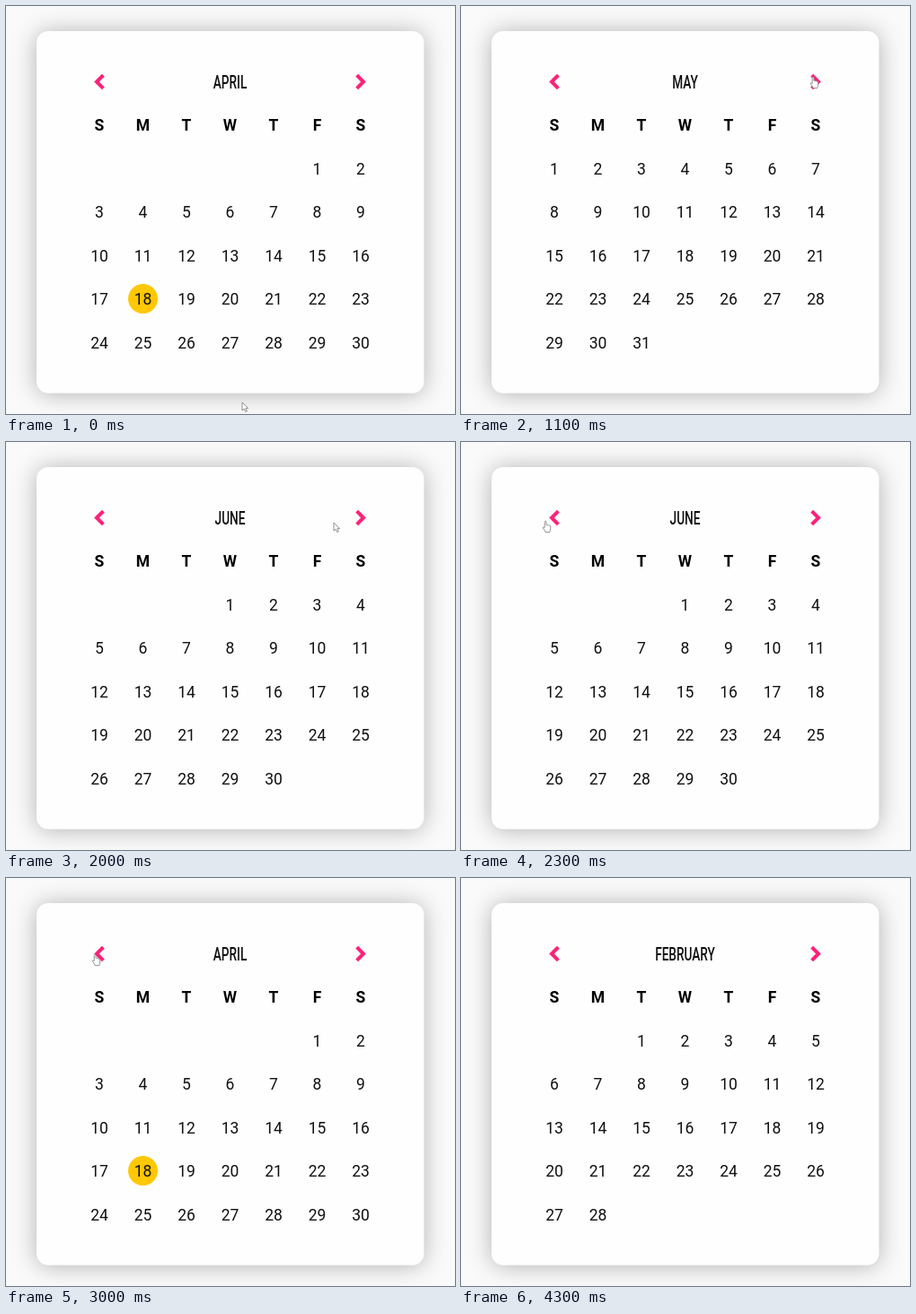
Write an HTML page with a canvas that moves like this. It is 500 px wide and 455 px high and loops after 4700 ms.

```html
<!DOCTYPE html>
<html lang="en">
<head>
<meta charset="utf-8">
<title>Calendar</title>
<style>
  html, body { margin: 0; width: 100%; height: 100%; overflow: hidden; background: #fafafa; }
  canvas { display: block; }
</style>
</head>
<body>
<canvas id="stage" width="500" height="455"></canvas>
<script>
const ctx = document.getElementById('stage').getContext('2d');
const LOOP = 4700;
const YEAR = 2022;
const MONTH_NAMES = ['JANUARY', 'FEBRUARY', 'MARCH', 'APRIL', 'MAY', 'JUNE'];
const PINK = '#ff2078';
const COLUMN = 48.5, ROW = 48.4, LEFT = 104, HEADER_Y = 133, FIRST_ROW_Y = 181.7;

// [time, month index]
const monthSteps = [[0, 3], [1100, 4], [1700, 5], [2600, 4], [3000, 3], [3500, 2], [3800, 1]];

// [time, shape, x, y]
const cursorSteps = [
  [0, 'arrow', 263, 442], [100, 'arrow', 300, 360], [200, 'arrow', 372, 205],
  [300, 'arrow', 410, 105], [500, 'arrow', 412.5, 82], [600, 'arrow', 404, 82],
  [700, 'hand', 393, 80], [800, 'hand', 389, 79],
  [2000, 'arrow', 365, 90], [2100, 'arrow', 250, 96], [2200, 'arrow', 140, 96],
  [2300, 'hand', 91, 88], [2500, 'hand', 96, 85],
  [4100, 'arrow', 150, 250], [4300, 'none', 0, 0]
];

const arrowPath = new Path2D('M0 0 V9.2 L2.2 7.2 L3.8 10.6 L5.4 9.9 L3.9 6.7 H6.8 Z');
const handPath = new Path2D(
  'M2.2 7.5 V1.3 Q2.2 .2 3.1 .2 Q4 .2 4 1.3 V4.4 Q5 3.8 5.7 4.8 Q6.7 4.2 7.3 5.2 ' +
  'Q8.6 4.8 8.7 6.2 V9 Q8.6 10.5 7.7 12.6 H3.2 Q2.4 10.6 .5 8.2 Q0 7 1 6.6 Z');

const stepAt = (steps, time) => steps.findLast(step => step[0] <= time);

function drawCard() {
  ctx.fillStyle = '#fafafa';
  ctx.fillRect(0, 0, 500, 455);
  ctx.save();
  ctx.shadowColor = 'rgba(0, 0, 0, .29)';
  ctx.shadowBlur = 27;
  ctx.shadowOffsetY = 1;
  ctx.fillStyle = '#fefefe';
  ctx.beginPath();
  ctx.roundRect(34, 28, 431.5, 403.7, 13);
  ctx.fill();
  ctx.restore();
}

function drawChevron(tipX, direction) {
  ctx.strokeStyle = PINK;
  ctx.lineWidth = 4;
  ctx.beginPath();
  ctx.moveTo(tipX - direction * 7.3, 77.2);
  ctx.lineTo(tipX, 84.5);
  ctx.lineTo(tipX - direction * 7.3, 91.8);
  ctx.stroke();
}

// Condensed heading face
function drawTitle(text) {
  ctx.save();
  ctx.translate(249.5, 92.2);
  ctx.scale(0.7, 1);
  ctx.font = '500 19.5px Roboto, sans-serif';
  ctx.fillStyle = '#111';
  ctx.fillText(text, 0, 0);
  ctx.restore();
}

function drawCell(text, column, y) {
  ctx.fillText(text, LEFT + column * COLUMN, y + 6.3);
}

function drawMonth(month) {
  drawTitle(MONTH_NAMES[month]);
  drawChevron(101, -1);
  drawChevron(398, 1);

  ctx.fillStyle = '#000';
  ctx.font = '700 17.5px Roboto, sans-serif';
  [...'SMTWTFS'].forEach((letter, column) => drawCell(letter, column, HEADER_Y));

  ctx.font = '400 17.5px Roboto, sans-serif';
  const offset = new Date(YEAR, month, 1).getDay();
  const dayCount = new Date(YEAR, month + 1, 0).getDate();
  for (let day = 1; day <= dayCount; day++) {
    const slot = offset + day - 1;
    const column = slot % 7;
    const y = FIRST_ROW_Y + Math.floor(slot / 7) * ROW;
    if (month === 3 && day === 18) {
      ctx.fillStyle = '#ffc800';
      ctx.beginPath();
      ctx.arc(LEFT + column * COLUMN, y - 0.4, 16.5, 0, Math.PI * 2);
      ctx.fill();
    }
    ctx.fillStyle = '#111';
    drawCell(day, column, y);
  }
}

function drawCursor([, shape, x, y]) {
  if (shape === 'none') return;
  const path = shape === 'hand' ? handPath : arrowPath;
  ctx.save();
  ctx.translate(x, y);
  ctx.fillStyle = '#fff';
  ctx.strokeStyle = '#858585';
  ctx.lineWidth = 0.9;
  ctx.fill(path);
  ctx.stroke(path);
  ctx.restore();
}

function render() {
  const time = performance.now() % LOOP;
  ctx.textAlign = 'center';
  drawCard();
  drawMonth(stepAt(monthSteps, time)[1]);
  drawCursor(stepAt(cursorSteps, time));
  requestAnimationFrame(render);
}
render();
</script>
</body>
</html>
```
